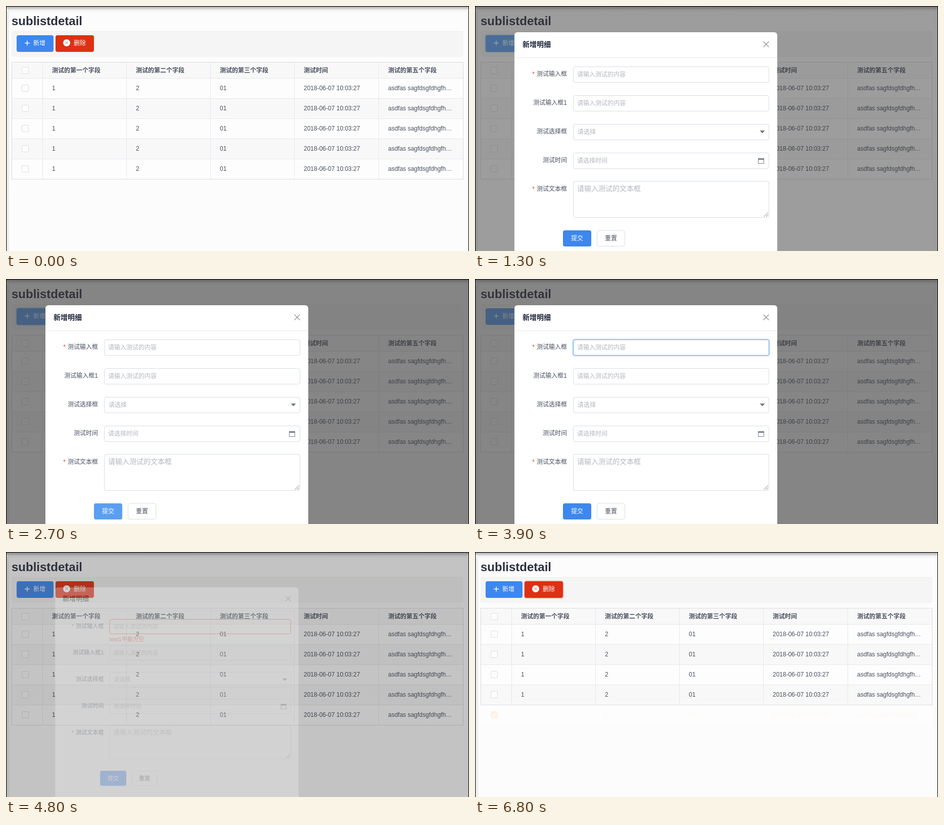
Animation of 916x486 px, one loop 7600 ms. Source, as an HTML page:

```html
<!DOCTYPE html>
<html lang="zh">
<head>
<meta charset="utf-8">
<title>sublistdetail</title>
<style>
html, body { margin: 0; width: 100%; height: 100%; overflow: hidden; }
body {
  position: relative; background: #fcfcfc; color: #495060;
  font: 12px/20px "Liberation Sans", "Noto Sans CJK SC", "Noto Sans CJK", sans-serif;
}
div, svg { position: absolute; box-sizing: border-box; white-space: nowrap; }
svg { left: 0; top: 0; width: 916px; height: 486px; fill: none; }
b { color: #ed3f14; font-weight: normal; margin-right: 4px; }
.shade {
  inset: 0;
  background: linear-gradient(#8c8c8c, #c8c8c8 4px, #f0f0f0 8px, #fcfcfc00 13px),
    linear-gradient(90deg, #d4d4d4, #fcfcfc00 7px),
    linear-gradient(270deg, #e4e4e4, #fcfcfc00 4px);
}
.frame { inset: 0; border: 1px solid #000; border-bottom: 0; }
.bar { background: #f5f5f5; border-top: 1px solid #f3efdf; border-radius: 4px; }
.btn { border-radius: 4px; color: #fff; }
.plain { background: #fff; border: 1px solid #d7dde4; }
.cell { border: solid #e6e8ec; border-width: 0 1px 1px 0; }
.check { background: #fdfdfd; border: 1px solid #dcdee2; border-radius: 2px; }
.table { border: 1px solid #d9dce1; }
.bold { font-weight: bold; }
.h1 { font-size: 24px; color: #2d3040; }
.title { font-size: 14px; color: #1c2438; }
.mask { inset: 0; background: rgba(55, 55, 55, .6); }
.modal { inset: 0; transform-origin: 338px 297px; }
.panel { background: #fff; border-radius: 6px; }
.label { text-align: right; }
.field { background: #fff; border: 1px solid #d7dde4; border-radius: 4px; }
.hint { color: #b4b7be; }
.big { font-size: 14px; }
.error { color: #ed3f14; }
.caret { background: #333; }
</style>
</head>
<body>
<script>
const BLUE = '#3d87ee', LIGHT_BLUE = '#5b9ff3', RED = '#de3014', LIGHT_RED = '#e5593f';
const LINE = '#d7dde4', ROW_HOVER = '#ebf7ff';

function box(parent, cls, x, y, w, h, html = '') {
  const el = document.createElement('div');
  el.className = cls;
  if (x !== undefined) {
    el.style.left = x + 'px';
    el.style.top = y + 'px';
    if (w) el.style.width = w + 'px';
    if (h) el.style.height = h + 'px';
  }
  el.innerHTML = html;
  parent.append(el);
  return el;
}
// Single line of text, centred vertically on cy
const text = (parent, cls, x, cy, html, w) => box(parent, cls, x, cy - 10, w, 20, html);
const icons = (parent, html) =>
  parent.insertAdjacentHTML('beforeend', `<svg viewBox="0 0 916 486">${html}</svg>`);

// Page
const page = document.body;
box(page, 'shade');
text(page, 'h1 bold', 11, 30, 'sublistdetail');
box(page, 'bar', 11, 50, 894, 51);
const addBtn = box(page, 'btn', 21, 58, 73, 33);
const delBtn = box(page, 'btn', 98, 58, 76, 33);
text(addBtn, '', 33, 16, '新增');
text(delBtn, '', 36, 16, '删除');
icons(page, `<path d="M37 73.5h10M42 68.5v10" stroke="#fff" stroke-width="1.4"/>
  <circle cx="120" cy="73" r="7" fill="#fff"/>
  <path d="M117.5 70.5l5 5m0-5l-5 5" stroke="#eea396" stroke-width="1.3"/>`);

// Table
const edges = [12, 73, 239, 405, 571, 738, 905];
function tableRow(y, h, cls, labels, bg) {
  const row = box(page, cls, 0, y, 905, h);
  const cells = edges.slice(0, -1).map((x, i) => {
    const cell = box(row, 'cell', x, 0, edges[i + 1] - x, h);
    cell.style.background = bg;
    if (i) text(cell, '', 18, h / 2 - (h > 32 ? 1 : 0), labels[i - 1]);
    return cell;
  });
  const check = box(row, 'check', 31, Math.round(h / 2) - (h > 32 ? 8 : 7), 14, 14);
  return { row, cells, check };
}
tableRow(112, 32, 'bold',
  ['测试的第一个字段', '测试的第二个字段', '测试的第三个字段', '测试时间', '测试的第五个字段'], '#f8f8f8');
const values = ['1', '2', '01', '2018-06-07 10:03:27', 'asdfas sagfdsgfdhgfh…'];
const stripe = i => i % 2 ? '#f8f8f8' : '#fdfdfd';
const rows = [0, 1, 2, 3, 4].map(i => tableRow(144 + 40 * i, 40, '', values, stripe(i)));
const last = rows[4];
last.check.innerHTML = '<svg viewBox="0 0 14 14" style="left:-1px;top:-1px;width:14px;height:14px">' +
  '<path d="M3.5 7l2.5 2.5 4.5-5" stroke="#fff" stroke-width="1.8"/></svg>';
const outline = box(page, 'table', 11, 111, 894);

// Dialog
const mask = box(page, 'mask');
const modal = box(page, 'modal');
box(modal, 'panel', 78, 52, 520, 490);
text(modal, 'title bold', 94, 76, '新增明细');
box(modal, '', 78, 102, 520, 1).style.background = '#e9eaec';
const star = '<b>*</b>';
const fields = [
  [star + '测试输入框', '请输入测试的内容'],
  ['测试输入框1', '请输入测试的内容'],
  ['测试选择框', '请选择'],
  ['测试时间', '请选择时间'],
  [star + '测试文本框', '请输入测试的文本框'],
].map(([label, hint], i) => {
  const y = 120 + 57 * i, area = i === 4;
  text(modal, 'label', 78, y + 15, label, 104);
  const field = box(modal, 'field', 194, area ? 347 : y, 388, area ? 73 : 32);
  text(modal, area ? 'hint big' : 'hint', i === 2 ? 203 : 202, area ? 362 : y + 16, hint);
  return field;
});
const caret = box(modal, 'caret', 202, 129, 1, 14);
const error = text(modal, 'error', 194, 163, 'test1不能为空');
const submit = box(modal, 'btn', 174, 445, 56, 32);
text(submit, '', 16, 16, '提交');
text(box(modal, 'btn plain', 241, 445, 56, 32), '', 15, 15, '重置').style.color = '#495060';
icons(modal, `<path d="M570.5 70.5l11 11m0-11l-11 11" stroke="#8f8f8f" stroke-width="1.2"/>
  <path d="M563.5 247h10l-5 5.5z" fill="#6f7787"/>
  <path d="M560.5 302.5h11v10h-11z" stroke="#777d88"/>
  <path d="M560 302h12v3h-12z" fill="#777d88"/>
  <path d="M571.5 418l8.5-8.5M576 418l4-4" stroke="#777"/>`);
box(page, 'frame');

// Motion
const ramp = (t, a, b) => Math.min(1, Math.max(0, (t - a) / (b - a)));
const pulse = (t, a, b, c, d) => ramp(t, a, b) - ramp(t, c, d);
const easeOut = p => 1 - (1 - p) * (1 - p);
const mix = (a, b, p) => `color-mix(in srgb, ${b} ${p * 100}%, ${a})`;
const glow = (rgb, p) => `0 0 0 2px rgba(${rgb}, ${.2 * p})`;
const paint = (row, color) => row.cells.forEach(c => c.style.background = color);

function draw(t) {
  addBtn.style.background = mix(BLUE, LIGHT_BLUE, pulse(t, 500, 700, 4400, 4600));
  addBtn.style.boxShadow = glow('45,140,240', pulse(t, 1000, 1200, 3300, 3400));
  delBtn.style.background = mix(RED, LIGHT_RED, pulse(t, 6100, 6200, 6600, 6800));
  delBtn.style.boxShadow = glow('237,63,20', ramp(t, 6300, 6500));

  mask.style.opacity = easeOut(ramp(t, 1050, 1500)) - ramp(t, 4580, 5000);
  const shown = easeOut(ramp(t, 1050, 1300)) - ramp(t, 4570, 4880);
  modal.style.opacity = shown;
  modal.style.transform = shown === 1 ? 'none' : `scale(${.9 + .1 * shown})`;

  submit.style.background = mix(BLUE, LIGHT_BLUE, pulse(t, 2600, 2700, 2800, 3000));
  const bad = ramp(t, 4300, 4500);
  fields[0].style.borderColor = mix(mix(LINE, '#57a3f3', ramp(t, 2900, 3100)), '#ed3f14', bad);
  fields[0].style.boxShadow = glow('45,140,240', ramp(t, 3300, 3500) - bad);
  caret.hidden = t < 3400 || t >= 3900;
  error.style.opacity = bad;

  const gone = t >= 6400, checked = ramp(t, 5700, 5900);
  paint(rows[3], mix(stripe(3), ROW_HOVER, t >= 5200 ? 1 - ramp(t, 5700, 5900) : 0));
  paint(last, gone ? '#fdfdfd' : mix(stripe(4), ROW_HOVER, ramp(t, 5380, 5500)));
  last.row.style.color = gone ? '#fef8f0' : '';
  last.cells.forEach(c => c.style.borderColor = gone ? 'transparent' : '');
  last.check.style.background = gone ? '#fef3e6' : mix('#fdfdfd', BLUE, checked);
  last.check.style.borderColor = gone ? '#fef3e6' : mix('#dcdee2', BLUE, checked);
  last.check.firstChild.style.opacity = checked;
  outline.style.height = (gone ? 193 : 233) + 'px';
}

const start = performance.now();
function tick() {
  const t = (performance.now() - start) % 7600;
  draw(Math.floor(t / 100) * 100);
  requestAnimationFrame(tick);
}
tick();
</script>
</body>
</html>
```
